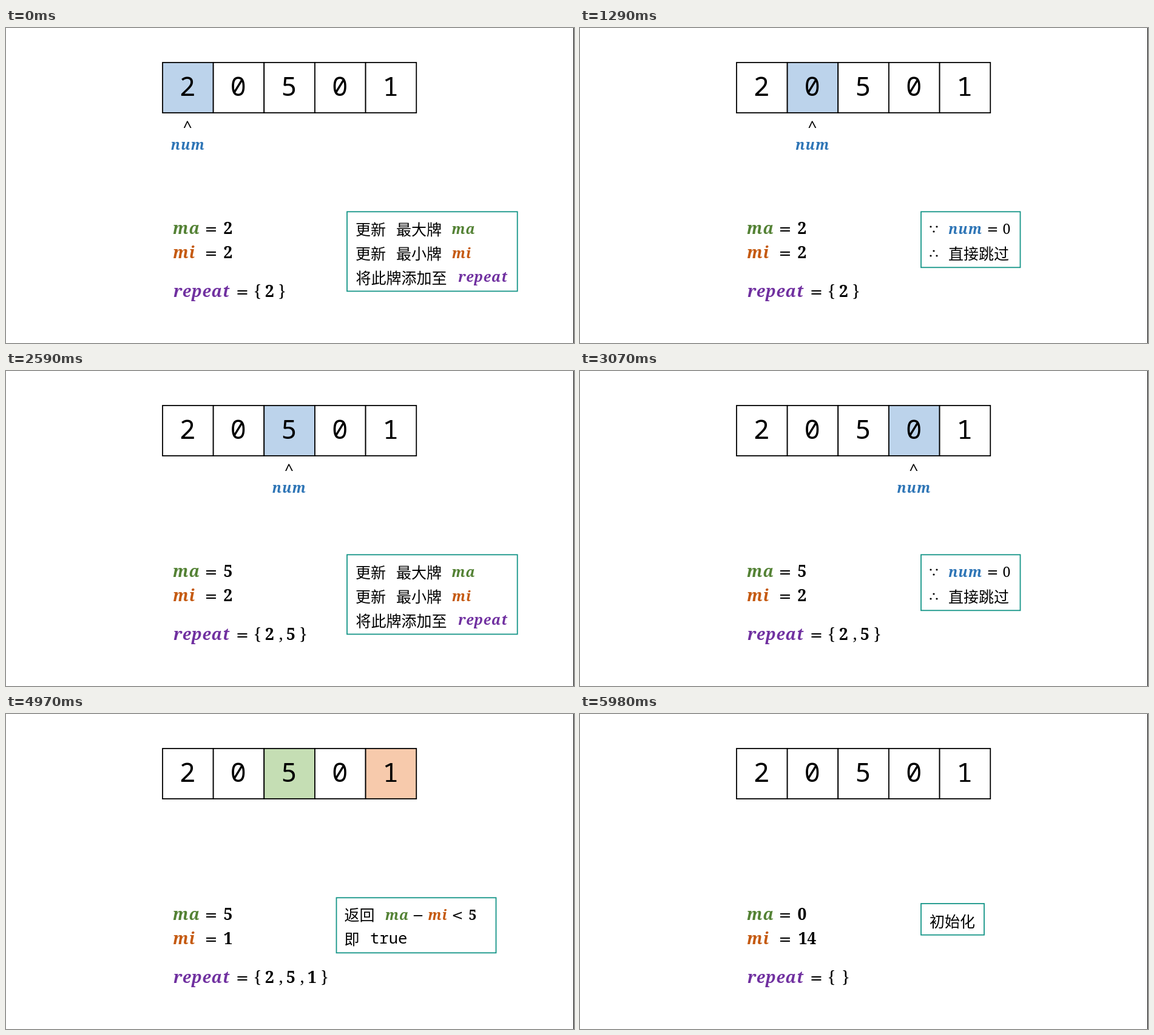
Recreate the animation shown at these times as an HTML page. Size 936 by 520 pixels, loop 6.02 s.

```html
<!DOCTYPE html>
<html lang="zh-CN">
<head>
<meta charset="utf-8">
<title>Array scan</title>
<style>
  html, body { margin: 0; width: 100%; height: 100%; overflow: hidden; background: #fff; }
  svg { display: block; width: 936px; height: 520px; }
  text { text-anchor: middle; white-space: pre; }
  .cell { font: 44px "Noto Sans Mono", monospace; }
  .code { font: 25.6px "Noto Sans Mono", monospace; }
  .start { text-anchor: start; }
  .cjk { font: 300 25px "Noto Sans CJK SC", "Noto Sans CJK", sans-serif; text-anchor: start; }
  .var { font-family: "Noto Serif", serif; font-weight: 700; font-style: italic; letter-spacing: 1px; }
  .num { font-family: "Noto Serif", serif; font-weight: 700; }
  .thin { font-family: "Noto Serif", serif; }
  .op { font-family: "DejaVu Sans", sans-serif; }
</style>
</head>
<body>
<svg id="stage" viewBox="0 0 936 520"></svg>
<script>
const LOOP = 6020;
const BIG = 26.5, SMALL = 23;
const COLOR = {
  num: '#2e75b6', ma: '#548235', mi: '#c55a11', repeat: '#7030a0',
  box: '#159588', current: '#bcd3eb', max: '#c5deb4', min: '#f7caac'
};
const DIGITS = [2, 0, 5, 0, 1];
const CELL = { x: 258, y: 57, w: 83.65, h: 83 };

const text = (cls, x, y, s, size, fill = '#000') =>
  `<text class="${cls}" x="${x}" y="${y}" fill="${fill}"${size ? ` font-size="${size}"` : ''}>${s}</text>`;
const variable = (name, x, y, size) => text('var', x, y, name, size, COLOR[name]);
const cjk = (x, y, s) => text('cjk', x, y, s);
const dot = (x, y) => `<circle cx="${x}" cy="${y}" r="1.6"/>`;
const box = (x, y, w, h) =>
  `<rect x="${x}" y="${y}" width="${w}" height="${h}" fill="none" stroke="${COLOR.box}" stroke-width="1.8"/>`;

const notes = {
  update: () => box(562, 303.3, 280.7, 131.2) +
    cjk(576, 341.5, '更新') + cjk(643, 341.5, '最大牌') + variable('ma', 754, 340, SMALL) +
    cjk(576, 381.5, '更新') + cjk(643, 381.5, '最小牌') + variable('mi', 751, 380, SMALL) +
    cjk(576.5, 421.5, '将此牌添加至') + variable('repeat', 786, 419, SMALL),
  skip: () => box(562, 303.3, 163.5, 92) +
    dot(578, 328) + dot(588, 328) + dot(583, 336) +
    variable('num', 635, 340, SMALL) + text('op', 680, 340, '=', SMALL) + text('thin', 703, 340, '0', SMALL) +
    dot(583, 368) + dot(578, 376) + dot(588, 376) + cjk(607, 381.5, '直接跳过'),
  result: () => box(544.5, 303.3, 263, 91) +
    cjk(557.5, 340.5, '返回') + variable('ma', 644.5, 339.5, SMALL) + text('op', 679, 339.5, '−', SMALL) +
    variable('mi', 711.5, 339.5, SMALL) + text('op', 744, 339.5, '&lt;', SMALL) + text('num', 769, 339.5, '5', SMALL) +
    cjk(557.5, 380.5, '即') + text('code start', 600, 379, 'true'),
  init: () => box(562, 313, 104, 51.7) + cjk(576, 351.5, '初始化')
};

const { current, max, min } = COLOR;
const STEPS = [
  { at: 0,    fills: { 0: current }, pointer: 0, ma: 2, mi: 2, set: [2], note: 'update' },
  { at: 930,  fills: { 1: current }, pointer: 1, ma: 2, mi: 2, set: [2], note: 'skip' },
  { at: 1940, fills: { 2: current }, pointer: 2, ma: 5, mi: 2, set: [2, 5], note: 'update' },
  { at: 2950, fills: { 3: current }, pointer: 3, ma: 5, mi: 2, set: [2, 5], note: 'skip' },
  { at: 3960, fills: { 4: current }, pointer: 4, ma: 5, mi: 1, set: [2, 5, 1], note: 'update' },
  { at: 4970, fills: { 2: max, 4: min }, ma: 5, mi: 1, set: [2, 5, 1], note: 'result' },
  { at: 5940, fills: {}, ma: 0, mi: 14, set: [], note: 'init' }
];

const cellCenter = i => 299 + i * 83.7;

function drawCells(fills) {
  return DIGITS.map((d, i) =>
    `<rect x="${CELL.x + i * CELL.w}" y="${CELL.y}" width="${CELL.w}" height="${CELL.h}"
      fill="${fills[i] || '#fff'}" stroke="#000" stroke-width="1.8"/>` +
    text('cell', cellCenter(i), 112, d)).join('');
}

function drawPointer(i) {
  if (i === undefined) return '';
  const x = 299.3 + i * 83.55;
  return text('code', x, 172, '^') + variable('num', x + 0.3, 201, SMALL);
}

function drawAssignment(name, x, y, value) {
  const center = value > 9 ? 374.5 : 366;
  return variable(name, x, y, BIG) + text('op', 338, y, '=', 25.5) + text('num', center, y, value, BIG);
}

function drawSet(items) {
  const y = 444;
  const close = items.length ? 420 + items.length * 35 : 438;
  return variable('repeat', 322.5, y, BIG) + text('op', 389.5, y, '=', 25.5) +
    text('thin', 414.5, y, '{', BIG) +
    items.map((v, i) =>
      (i ? text('thin', 418 + i * 35, y, ',', BIG) : '') +
      text('num', 434.5 + i * 35, y, v, BIG)).join('') +
    text('thin', close, y, '}', BIG);
}

function draw(step) {
  return '<path d="M935.5 0V520" stroke="#000"/>' +
    drawCells(step.fills) + drawPointer(step.pointer) +
    drawAssignment('ma', 297.5, 340, step.ma) +
    drawAssignment('mi', 293.5, 379.5, step.mi) +
    drawSet(step.set) + notes[step.note]();
}

const stage = document.getElementById('stage');
const begin = performance.now();
let shown;

function render(now) {
  const t = Math.max(0, now - begin) % LOOP;
  const step = STEPS.findLast(s => s.at <= t);
  if (step !== shown) {
    stage.innerHTML = draw(step);
    shown = step;
  }
  requestAnimationFrame(render);
}
render(begin);
</script>
</body>
</html>
```
